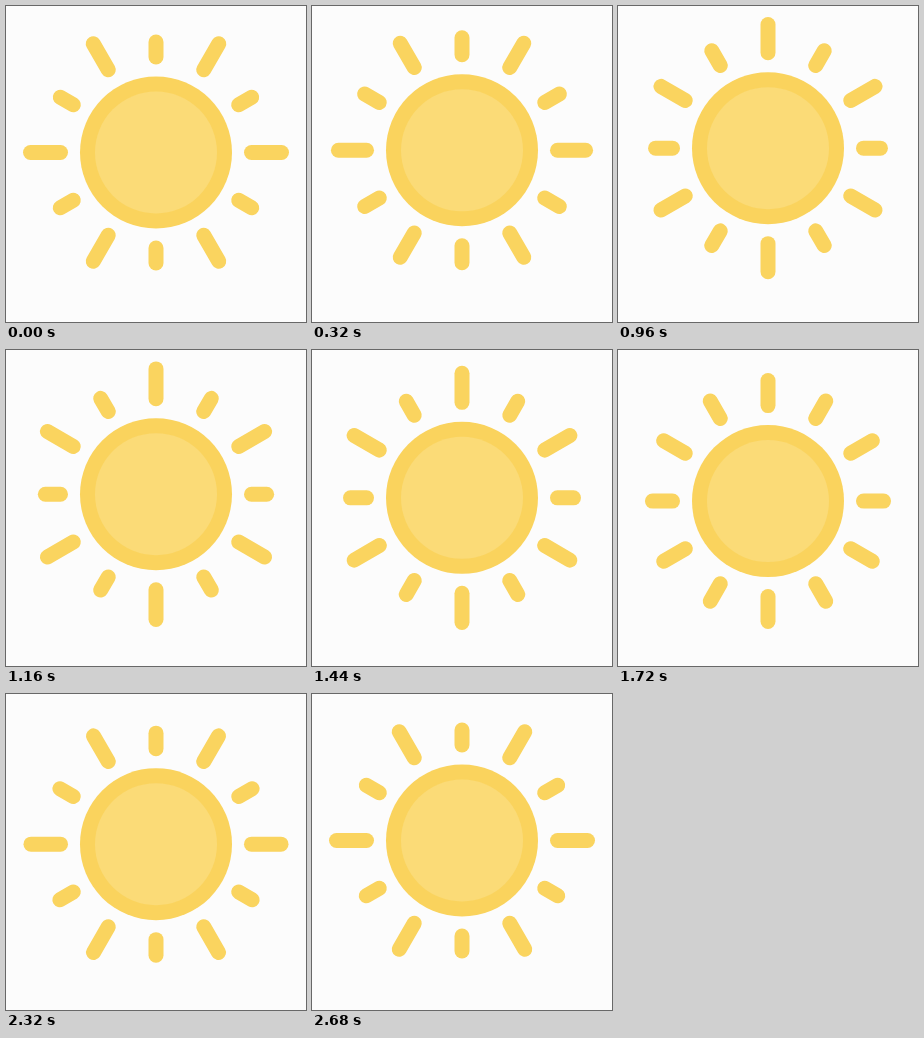
Write an HTML page that moves like this. It is 300 px wide and 316 px high and loops after 2.92 s.

```html
<!DOCTYPE html>
<html lang="en">
<head>
<meta charset="utf-8">
<title>Sun</title>
<style>
  html, body { margin: 0; width: 100%; height: 100%; overflow: hidden; background: #fcfcfc; }
  svg { display: block; width: 100%; height: 100%; }
</style>
</head>
<body>
<svg viewBox="0 0 300 316">
  <rect width="300" height="316" fill="#fcfcfc"/>
  <g id="sun">
    <g id="rays" stroke="#fad45f" stroke-width="15" stroke-linecap="round"></g>
    <circle r="76" fill="#fad35d"/>
    <circle r="61" fill="#fbdb77"/>
  </g>
</svg>
<script>
const LOOP = 2920, STEP = 40;
const INNER = 95.5, SHORT = 110.5, LONG = 125.5;

// [time, value] keys, eased in and out between neighbours
const HEIGHT = [[40, 146.5], [680, 141], [2040, 152.6], [2680, 146.5]];
const SWAP = [[40, 0], [1240, 1], [2460, 0]];

const sun = document.getElementById('sun');
const rays = Array.from({ length: 12 }, (_, i) => {
  const line = document.createElementNS('http://www.w3.org/2000/svg', 'line');
  line.setAttribute('x1', INNER);
  line.setAttribute('transform', `rotate(${i * 30})`);
  return document.getElementById('rays').appendChild(line);
});

const mix = (a, b, k) => a + (b - a) * k;

function track(keys, t) {
  if (t <= keys[0][0]) return keys[0][1];
  for (let i = 1; i < keys.length; i++) {
    const [t0, a] = keys[i - 1], [t1, b] = keys[i];
    if (t < t1) return mix(a, b, (1 - Math.cos(Math.PI * (t - t0) / (t1 - t0))) / 2);
  }
  return keys[keys.length - 1][1];
}

function draw(ms) {
  const t = Math.floor((ms % LOOP) / STEP) * STEP;
  const p = track(SWAP, t);
  sun.setAttribute('transform', `translate(150 ${track(HEIGHT, t)})`);
  rays.forEach((ray, i) => ray.setAttribute('x2', mix(SHORT, LONG, i % 2 ? p : 1 - p)));
}

let start;
function tick(now) {
  start ??= now;
  draw(now - start);
  requestAnimationFrame(tick);
}
draw(0);
requestAnimationFrame(tick);
</script>
</body>
</html>
```
